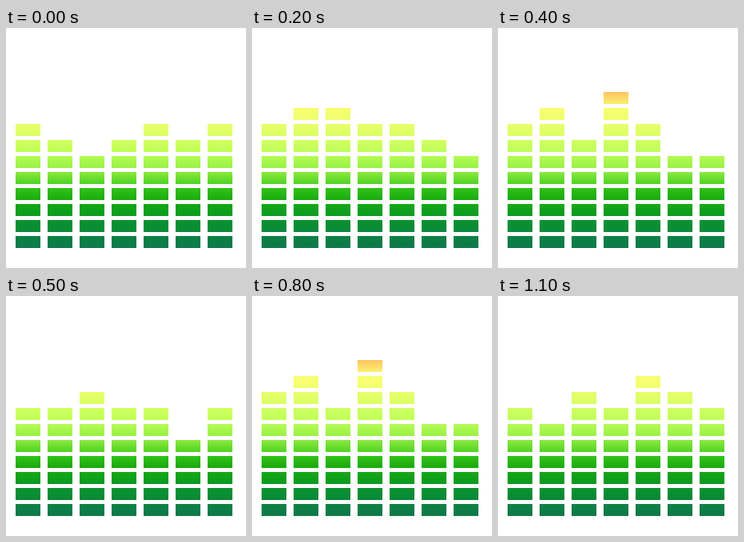
Recreate the animation shown at these times as an HTML page. Size 300 px wide and 300 px high, loop 1.2 s.

```html
<!DOCTYPE html>
<html lang="en">
<head>
<meta charset="utf-8">
<title>Equalizer</title>
<style>
  html, body { margin: 0; height: 100%; overflow: hidden; background: #fff; }

  .eq {
    position: absolute;
    left: 12px;
    top: 75px;
    height: 200px;
    display: flex;
    align-items: flex-end;
    gap: 9px;
    animation: levels 1200ms step-end infinite;
  }

  /* White gaps over one shared colour ramp, both anchored to the floor */
  .eq i {
    width: 31px;
    height: calc(var(--n) * 20px - 5px);
    background:
      repeating-linear-gradient(to top, transparent 0 15px, #fff 15px 20px) bottom / 100% 200px no-repeat,
      linear-gradient(
        #fbc360 5px, #fcf070 20px, #f8ff70 25px, #efff6d 40px,
        #e6ff69 45px, #d9ff64 60px, #d0ff60 65px, #bffd58 80px,
        #b5fb54 85px, #98f045 100px, #8aea3e 105px, #4fd322 120px,
        #33c218 125px, #18aa0f 140px, #14a815 145px, #0a9a22 160px,
        #0a9430 165px, #0a8838 180px, #0c8243 185px, #0f784a 200px
      ) bottom / 100% 200px no-repeat;
  }

  .eq i:nth-child(1) { --n: var(--a); }
  .eq i:nth-child(2) { --n: var(--b); }
  .eq i:nth-child(3) { --n: var(--c); }
  .eq i:nth-child(4) { --n: var(--d); }
  .eq i:nth-child(5) { --n: var(--e); }
  .eq i:nth-child(6) { --n: var(--f); }
  .eq i:nth-child(7) { --n: var(--g); }

  /* Lit blocks per bar; the sequence runs forward, then back */
  @keyframes levels {
    0%, 100%       { --a: 8; --b: 7; --c: 6; --d: 7;  --e: 8; --f: 7; --g: 8; }
    8.33%, 91.66%  { --a: 7; --b: 6; --c: 8; --d: 7;  --e: 9; --f: 8; --g: 7; }
    16.66%, 83.33% { --a: 8; --b: 9; --c: 9; --d: 8;  --e: 8; --f: 7; --g: 6; }
    25%, 75%       { --a: 7; --b: 8; --c: 8; --d: 9;  --e: 8; --f: 6; --g: 7; }
    33.33%, 66.66% { --a: 8; --b: 9; --c: 7; --d: 10; --e: 8; --f: 6; --g: 6; }
    41.66%, 58.33% { --a: 7; --b: 7; --c: 8; --d: 7;  --e: 7; --f: 5; --g: 7; }
    50%            { --a: 6; --b: 6; --c: 7; --d: 6;  --e: 6; --f: 4; --g: 8; }
  }
</style>
</head>
<body>
<div class="eq"><i></i><i></i><i></i><i></i><i></i><i></i><i></i></div>
</body>
</html>
```
